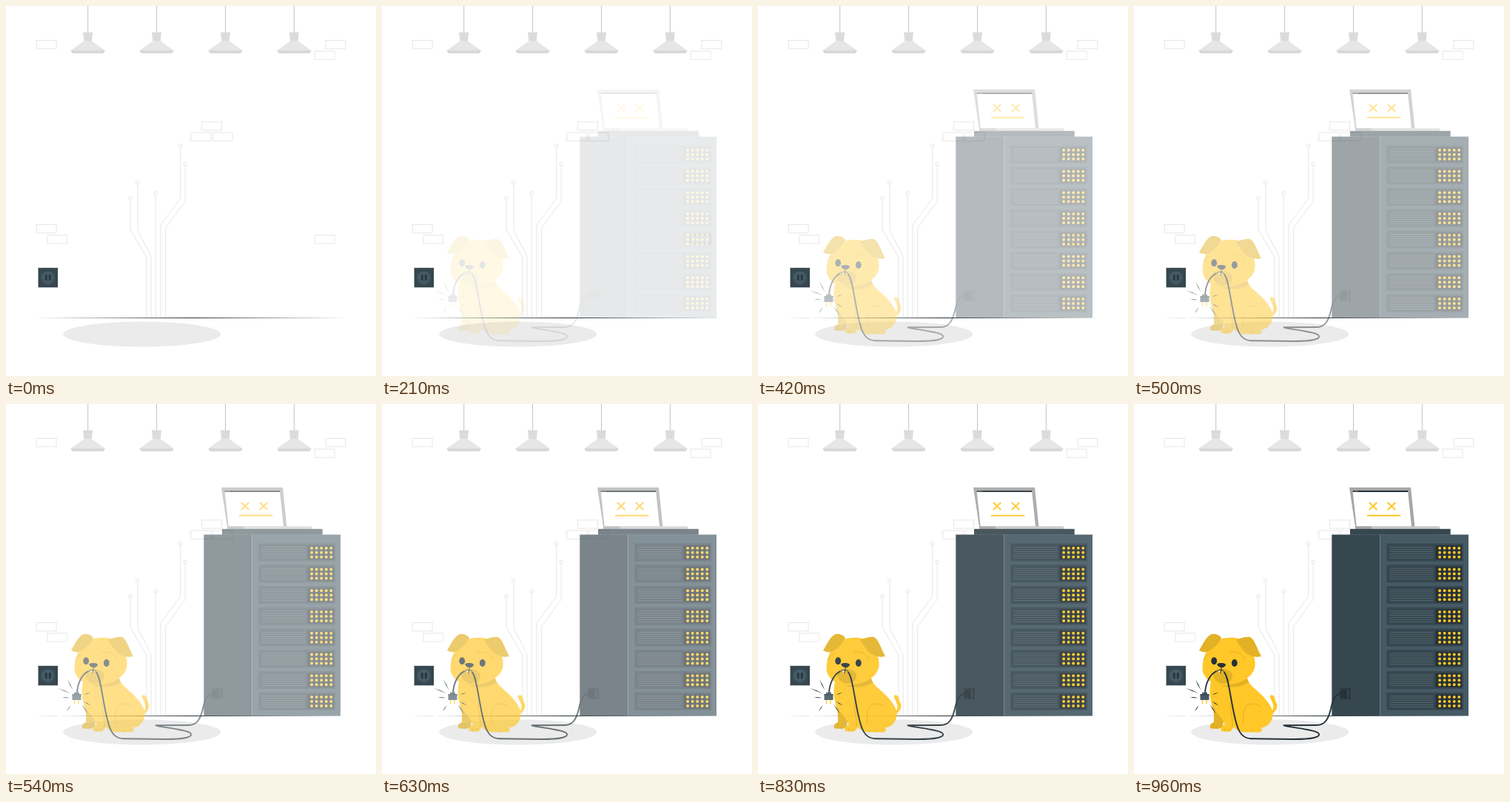
Animation, 500 px wide and 500 px high, one loop 1000 ms. Source, as an HTML page:

```html
<!DOCTYPE html>
<html lang="en">
<head>
<meta charset="utf-8">
<title>Unplugged server</title>
<style>
html, body { margin: 0; width: 100%; height: 100%; overflow: hidden; background: #fff; }
svg { display: block; width: 100%; height: 100%; }
.fine { fill: none; stroke: #e6e6e6; }
.dark { fill: #37474f; }
.mid { fill: #455a64; }
.ink { fill: #263238; }
.gold { fill: #ffc727; }
.shade { fill: #e3b124; }
.crease { fill: none; stroke: #dba91e; stroke-width: .8; stroke-linecap: round; }
.cable { fill: none; stroke: #263238; stroke-width: 1.9; stroke-linecap: round; stroke-linejoin: round; }
</style>
</head>
<body>
<svg viewBox="0 0 500 500">
  <defs>
    <g id="lamp">
      <path d="M0 0V37" stroke="#c4c4c4"/>
      <path d="M-6.6 35.5H6.4L5.2 47.5H-5.2Z" fill="#dbdbdb"/>
      <path d="M-4.8 47H4.8L23 60H-23Z" fill="#e6e6e6"/>
      <path d="M-23 60H23Q23 62.5 20.5 64H-20.5Q-23 62.5-23 60Z" fill="#d8d8d8"/>
    </g>
  </defs>

  <g id="room"></g>
  <g class="fine" id="traces">
    <path d="M168 262.5V302L190 339.5V421M178 241.500V303L196 338V421M202.200 255V421M235.700 191V260L209 296V421M242.200 216V264L215.700 300V421"/>
  </g>
  <path d="M38 421.500L250 420.900L462 421.500L250 422.100Z" fill="#263238"/>
  <ellipse cx="183.700" cy="443.500" rx="106.500" ry="17" fill="#ebebeb"/>
  <rect x="43.500" y="353.800" width="26.500" height="26.500" class="dark"/>
  <circle cx="56.700" cy="367.200" r="9" class="mid"/>
  <g class="ink">
    <rect x="53" y="363" width="2.500" height="8" rx="1"/>
    <rect x="58" y="363" width="2.500" height="8" rx="1"/>
  </g>

  <g id="scene" opacity="0">
    <!-- laptop -->
    <path d="M291 112.800H374L379.500 166H299Z" fill="#a6a6a6"/>
    <path d="M295.500 117H370L375 165.500H300.700Z" fill="#fff"/>
    <path d="M295.500 117H370L370.200 119H295.700Z" class="ink"/>
    <path d="M297.500 118h1m1 0h1m1 0h1" stroke="#fff" stroke-width=".7"/>
    <path d="M300 165.300H413V169H300Z" fill="#c7c7c7"/>
    <path d="M299 165.300H321V169H299Z" fill="#a6a6a6"/>
    <path d="M317.800 133L328.300 143M328.300 133L317.800 143M342.800 133L353.300 143M353.300 133L342.800 143M315 150.800H360.300" fill="none" stroke="#ffc727" stroke-width="2"/>

    <!-- rack -->
    <rect x="292" y="168.800" width="135.700" height="8" class="dark"/>
    <rect x="267.300" y="176.500" width="65.200" height="245" class="dark"/>
    <rect x="332.500" y="176.500" width="119.500" height="245" class="mid"/>
    <path d="M332.500 176.500V421.500" stroke="#6f8089" stroke-width=".8"/>
    <g id="units"></g>
    <rect x="278" y="384" width="15" height="15" fill="#2b3a41"/>
    <path d="M278.500 388H283V386H288.500V398H283V396H278.500Z" class="ink"/>
    <path d="M288.700 386V398" stroke="#455a64" stroke-width=".8"/>

    <!-- dog -->
    <path d="M183 418C191 413 189 406 184 397C182.500 393 187 391.500 189.500 395.500C191 399 191 402 193 405C195 411 191 416 186 419Z" class="gold"/>
    <path d="M104 396C104 406 108 414 108 422V430C104 431 102 435 103 438C109 439.500 116 439 119 437L125 415Z" class="shade"/>
    <path d="M106 368C100 386 102 402 109 413C113 419 119 424 123 433C118 435 116.500 439 118 442C124 443.500 131 443 133 440L134 436C140 442 146 444 152 443.500H170C173.500 442 174 439 171 437.500C181 437 187.500 429 188 417C185 404 172 392 159 381C155 376 153 372 152 368Z" class="gold"/>
    <path d="M107 374C117 384 141 386 155 376L153 371C140 379 121 382 108 375Z" class="shade"/>
    <path d="M104 325C112 316 130 314 142 317C154 320 160 330 162 341C165 351 164 359 158 366C149 375 134 380 122 380C108 379 97 374 93 362C91 350 96 334 104 325Z" class="gold"/>
    <path d="M88 333C93 325 98 313 105 311C111 310 116 313 118 316C114 325 104 334 98 335C94 336 90 334 88 333Z" class="shade"/>
    <path d="M138 319C144 316 152 314 157 315C163 318 166 330 172 341C166 343 158 341 152 337C147 333 142 325 138 319Z" class="shade"/>
    <path d="M106.500 364C109 358 114 357 118 358C124 357.500 130 360 133 365C134 373 128 378 120 378C112 377 107 371 106.500 364Z" class="shade"/>
    <path class="crease" d="M129 336C138 333 148 337 149 346M94 346C96 341 99 339 103 338M148 432C146 420 149 408 156 406C162 404 168 406 171 409M130 404C130 415 134 426 133 437M123 442V439M128 442V439M107 438V435M112 439V436M159 443V440"/>
    <g class="ink">
      <ellipse cx="108.200" cy="347.300" rx="3.900" ry="5"/>
      <ellipse cx="135.800" cy="350" rx="3.900" ry="5"/>
      <path d="M112.300 351.500C115 349.500 122 349.700 124 351.700C124 354 121 356.300 118.500 356.300C115.500 356 112.500 354 112.300 351.500Z"/>
    </g>
    <path d="M114 361L116.200 359.700L116 364Z" fill="#fff"/>
    <path d="M118 356V359.500C116 359 113 360 111 362M118 359.500C120 359.500 122 361 123 363M118 359L116.500 364" fill="none" stroke="#263238" stroke-width="1"/>

    <!-- cable and plug -->
    <path class="cable" d="M96 391C96.500 378 102 366 110.500 361.500M122 363C127 367 129 389 135 418C139 437 143 452 158 452.300L215 453C243 453 251 450 250 446C248.500 440 212 437.500 202.500 434.300L247 434C259 434 263 424 266 412C269 398 272 393 279 391.500"/>
    <path d="M92 389.800H99V392H101.500V400H89.500V392H92Z" class="mid"/>
    <path d="M89.500 392H101.500V393.500H89.500Z" class="dark"/>
    <path d="M92.600 400V405.500M98 400V405.500" stroke="#ffc727" stroke-width="1.500"/>
    <path id="sparks" class="ink"/>
  </g>
</svg>
<script>
const $ = id => document.getElementById(id);
const range = n => [...Array(n).keys()];
const rect = (x, y, w, h, extra) => `<rect x="${x}" y="${y}" width="${w}" height="${h}" ${extra}/>`;
const dot = (x, y, r, cls) => `<circle cx="${x}" cy="${y}" r="${r}" class="${cls}"/>`;

const bricks = [[41.2, 46.5], [432, 46.5], [417.2, 61], [264.7, 156.800], [249.800, 171],
  [279.2, 171], [41.2, 295.5], [56, 309.800], [417.2, 309.800]];
$('room').innerHTML =
  bricks.map(([x, y]) => rect(x, y, 26.800, 11.300, 'class="fine"')).join('') +
  range(4).map(i => `<use href="#lamp" x="${110.700 + 92.900 * i}"/>`).join('');

const ends = [[168, 260], [177.800, 239], [202.1, 252.7], [235.7, 188.7], [242.2, 213.5]];
$('traces').innerHTML += ends.map(([x, y]) => dot(x, y, 2.3, 'fine')).join('');

function unit(i) {
  const y = 188.5 + 28.75 * i;
  const vents = range(6).map(k => `M345.5 ${y + 5 + k * 2.900}H404.5`).join('');
  const lights = range(15).map(k =>
    dot(413.1 + 6.550 * (k % 5), y + 6.2 + 6 * Math.floor(k / 5), 1.95, 'gold'));
  return rect(341.5, y, 103.5, 24, 'class="dark"') +
    `<path d="${vents}" stroke="#5a6d76" stroke-width=".8"/>` +
    rect(407.5, y + 2.5, 35.5, 19.5, 'class="ink"') + lights.join('');
}
$('units').innerHTML = range(8).map(unit).join('');

// Sliver pointed at both ends
function spark([x1, y1, x2, y2]) {
  const len = Math.hypot(x2 - x1, y2 - y1);
  const dx = (y1 - y2) / len * .6, dy = (x2 - x1) / len * .6;
  const mx = (x1 + x2) / 2, my = (y1 + y2) / 2;
  return `M${x1} ${y1}L${mx + dx} ${my + dy}L${x2} ${y2}L${mx - dx} ${my - dy}Z`;
}
$('sparks').setAttribute('d', [[83, 372, 90.5, 387], [70, 384, 87.5, 391], [75.5, 396, 86.5, 397.2],
  [82, 415.5, 87.5, 407], [105.5, 393, 114, 390], [105.5, 402, 114.5, 407.5],
  [102, 405.5, 111, 418.5]].map(spark).join(''));

// Fade in at 24 steps per second, eased between linear and sine
function fade(ms) {
  const step = Math.floor((ms % 1000 + 4) * .024);
  const u = Math.min(1, Math.max(0, (step - 1.4) / 21.6));
  return (u + (1 - Math.cos(Math.PI * u)) / 2) / 2;
}

let start;
function draw(now) {
  start ??= now;
  $('scene').setAttribute('opacity', fade(now - start).toFixed(3));
  requestAnimationFrame(draw);
}
requestAnimationFrame(draw);
</script>
</body>
</html>
```
